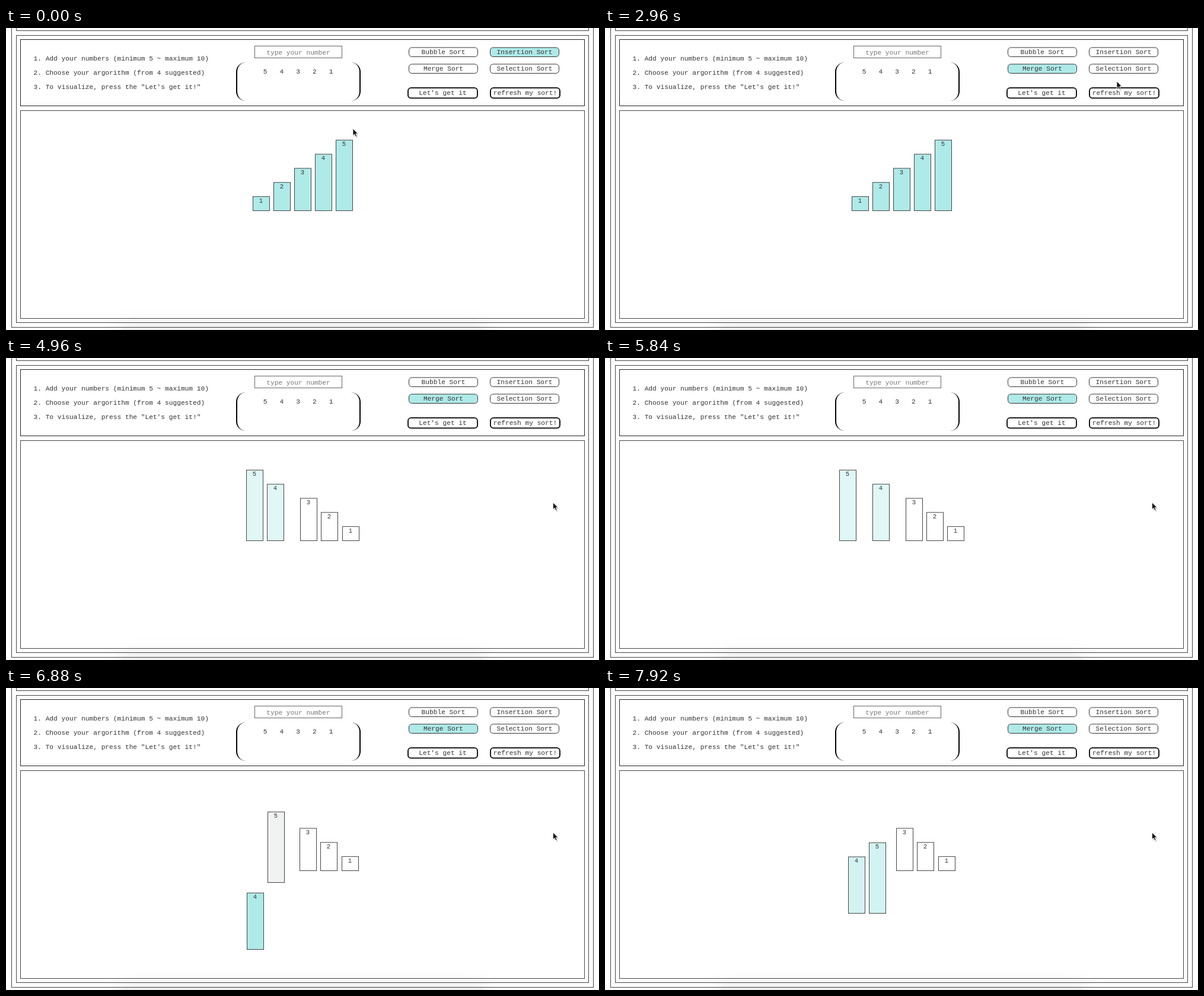
An HTML page for the animation above (8 s loop, 1000x510 px).

```html
<!DOCTYPE html>
<html lang="en">
<head>
<meta charset="utf-8">
<title>Sort visualizer</title>
<style>
html, body { margin: 0; width: 100%; height: 100%; overflow: hidden; background: #fff; }
svg { display: block; position: absolute; left: 0; top: 0; }
text { font: 11.2px "Liberation Mono", "Courier New", monospace; fill: #333; white-space: pre; }
.mid { text-anchor: middle; }
.hint { fill: #777; }
.bar text { font-size: 10.6px; }
.box, .bar rect { fill: none; stroke: #444; }
.btn { fill: #fff; stroke: #333; }
.big { stroke: #000; stroke-width: 1.8; }
#tray { position: absolute; left: 388px; top: 58px; width: 210px; height: 65px; box-sizing: border-box;
  border: solid #000; border-width: 0 2px; border-radius: 16px; }
#dock { position: absolute; left: 191px; top: 505px; width: 618px; height: 40px; border-radius: 12px;
  background: #eee; box-shadow: 0 0 30px 5px rgba(0, 0, 0, .09); mix-blend-mode: multiply; }
#stage { position: relative; width: 1000px; height: 510px; overflow: hidden; }
</style>
</head>
<body>
<div id="stage">
  <svg id="page" width="1000" height="510"></svg>
  <div id="tray"></div>
  <div id="dock"></div>
  <svg width="1000" height="510">
    <g id="cursor">
      <g id="arrow">
        <path d="M1 2V14L4 11.4 6 16 8.2 15 6.3 10.7H10Z" fill="#000" opacity=".18"/>
        <path d="M0 0V11.6L2.7 9.2 4.6 13.4 6.6 12.5 4.8 8.4H8.4Z" fill="#111" stroke="#fff" stroke-width=".8"/>
      </g>
      <path id="beam" d="M-2.5 -6Q0 -6 0 -4Q0 -6 2.5 -6M0 -4V4M-2.5 6Q0 6 0 4Q0 6 2.5 6M-1.3 2H1.3" fill="none" stroke="#222"/>
      <path id="hand" d="M-1.3 7V1Q-1.3 -.5 0 -.5T1.2 1V4.6Q2.4 3.8 3.3 5Q4.6 4.3 5.4 5.6Q7 5.2 7 7V9.5Q6.8 11 5.8 12.6V14H-.2V12.6L-4 8.4Q-4.3 6.6-2.6 6.7ZM1.4 8.5V12M3.4 8.5V12M5 8.5V12" fill="#fff" stroke="#222" stroke-width=".9"/>
    </g>
  </svg>
</div>
<script>
const LOOP = 8000, STEP = 80;
const CYAN = '#aeeae8';
const page = document.getElementById('page');
const $ = id => document.getElementById(id);

function add(tag, attrs, parent = page, label) {
  const el = document.createElementNS('http://www.w3.org/2000/svg', tag);
  for (const k in attrs) el.setAttribute(k, attrs[k]);
  if (label !== undefined) el.textContent = label;
  return parent.appendChild(el);
}
const box = (x, y, x2, y2, stroke = '#444') =>
  add('rect', { x: x + .5, y: y + .5, width: x2 - x, height: y2 - y, class: 'box', style: `stroke:${stroke}` });
const say = (x, y, label, cls = '') => add('text', { x, y, class: cls }, page, label);

function button(x, y, w, h, label, big = '') {
  const el = add('rect', { x, y, width: w, height: h, rx: 5, class: 'btn ' + big });
  say(x + w / 2, y + h / 2 + 3.6, label, 'mid');
  return el;
}

// page frames
box(9, -20, 990, 505);
box(17, -20, 982, 4);
box(17, 12, 982, 497);
box(24, 19, 975, 131, '#222');
box(24, 139, 975, 490);

say(46.5, 55, '1. Add your numbers (minimum 5 ~ maximum 10)');
say(46.5, 79, '2. Choose your argorithm (from 4 suggested)');
say(46.5, 102.5, '3. To visualize, press the "Let\'s get it!"');
box(419, 30, 566, 50, '#666');
say(493, 45, 'type your number', 'mid hint');
for (let i = 0; i < 5; i++) say(437 + i * 27.8, 76.6, 5 - i, 'mid');

button(679.5, 33, 116, 15.5, 'Bubble Sort');
const insertion = button(816.5, 33, 116, 15.5, 'Insertion Sort');
const merge = button(679.5, 61, 116, 15.5, 'Merge Sort');
button(816.5, 61, 116, 15.5, 'Selection Sort');
button(678, 101.2, 117, 17.2, "Let's get it", 'big');
button(817, 101.2, 117, 17.2, 'refresh my sort!', 'big');

const bars = [1, 2, 3, 4, 5].map(n => {
  const g = add('g', { class: 'bar' });
  const h = n * 23.85;
  const rect = add('rect', { x: .5, y: .5 - h, width: 28, height: h }, g);
  add('text', { x: 14, y: 10.7 - h, class: 'mid' }, g, n);
  return { n, g, rect };
});

// value at time t along [time, value] points
function track(t, pts) {
  if (t <= pts[0][0]) return pts[0][1];
  for (let i = 1; i < pts.length; i++) {
    const [a, u] = pts[i - 1], [b, v] = pts[i];
    if (t <= b) return u + (v - u) * (t - a) / (b - a);
  }
  return pts[pts.length - 1][1];
}
const tint = k => `rgb(${[174, 234, 232].map(c => Math.round(255 + (c - 255) * k))})`;

const path = [[0, 585, 170], [240, 583, 166], [880, 524, 62], [1200, 518, 37], [1760, 518, 37],
  [2240, 737, 66], [2560, 737, 66], [2960, 863, 90], [3120, 866, 91], [3520, 740, 110],
  [3680, 722.5, 112], [4240, 722.5, 112], [4720, 922.5, 244]];
const along = axis => path.map(p => [p[0], p[axis]]);
const pathX = along(1), pathY = along(2);

const splitPair = [[4960, 0], [5200, 21], [6400, 21], [6720, 0]];
const splitHalf = [[4000, 0], [4240, 21], [6400, 21], [6720, 19], [7520, 19], [7920, 10.8]];
const swap = [[6400, 0], [6720, 1]];
const drop4 = [[6400, 0], [6880, 133], [6960, 143], [7520, 143], [7920, 71.5]];
const drop5 = [[6800, 0], [6880, 19.5], [7360, 143], [7520, 143], [7920, 71.5]];
const tint4 = [[6400, .38], [6720, 1], [7520, 1], [7920, .55]];
const tint5 = [[6960, .1], [7360, 1], [7520, 1], [7920, .55]];

function fillOf(n, t) {
  if (t < 4000) return CYAN;
  if (t < 4960) return tint(.38);
  if (n < 4) return '#fff';
  if (n === 4) return tint(track(t, tint4));
  if (t < 6400) return tint(.38);
  return t < 6960 ? '#f1f2f2' : tint(track(t, tint5));
}

function drawBars(t) {
  const a = track(t, splitPair), b = track(t, splitHalf), s = track(t, swap);
  const left = 415.5 - (a + b) / 2;
  const slotX = i => left + i * 35.15 + (i > 0 ? a : 0) + (i > 1 ? b : 0);
  for (const { n, g, rect } of bars) {
    let x = slotX(t < 4000 ? n - 1 : 5 - n), y = 308;
    if (n > 3 && t >= 4000) {
      x += (slotX(n - 4) - x) * s;
      y += track(t, n === 4 ? drop4 : drop5);
    }
    g.setAttribute('transform', `translate(${Math.round(x)} ${Math.round(y)})`);
    rect.style.fill = fillOf(n, t);
  }
}

function drawCursor(t) {
  const x = track(t, pathX), y = track(t, pathY);
  const inside = (l, u, r, d) => x > l && x < r && y > u && y < d;
  const kind = inside(419, 30, 567, 51) ? 'beam'
    : inside(679, 33, 796, 49) || inside(679, 61, 796, 77) || inside(678, 101, 795, 119) ? 'hand' : 'arrow';
  for (const id of ['arrow', 'beam', 'hand']) $(id).style.display = id === kind ? '' : 'none';
  $('cursor').setAttribute('transform', `translate(${x} ${y})`);
}

function frame() {
  const t = Math.floor(performance.now() % LOOP / STEP) * STEP;
  insertion.style.fill = t < 2400 ? CYAN : '#fff';
  merge.style.fill = t < 2400 ? '#fff' : CYAN;
  drawBars(t);
  drawCursor(t);
  requestAnimationFrame(frame);
}
frame();
</script>
</body>
</html>
```
